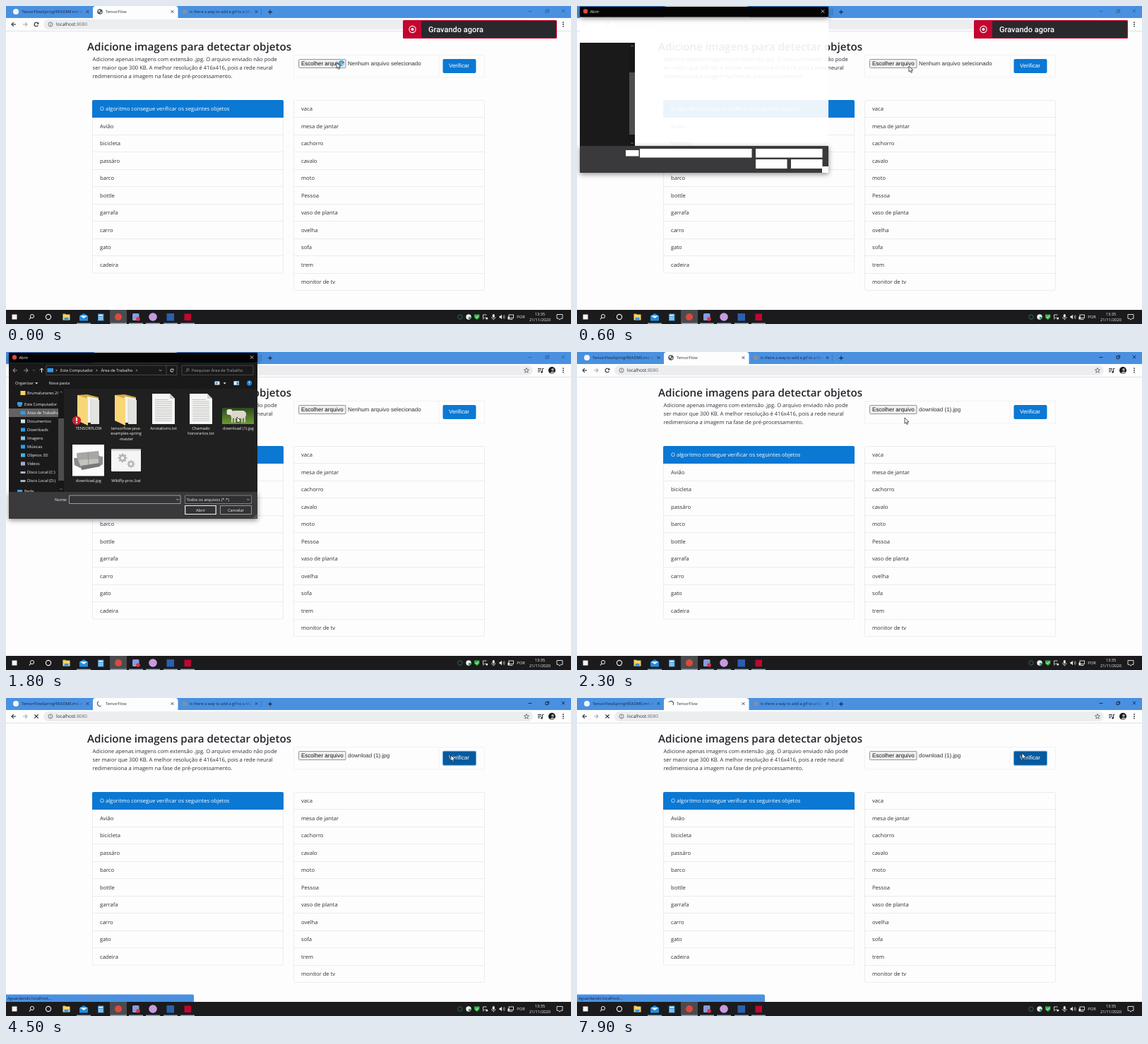
An HTML page with a canvas for the animation above (8000 ms loop, 800 by 450 pixels).

```html
<!DOCTYPE html>
<html lang="pt">
<head>
<meta charset="utf-8">
<title>Detector de objetos</title>
<style>
html, body { margin: 0; width: 100%; height: 100%; overflow: hidden; background: #fefdfe; }
canvas { display: block; width: 800px; height: 450px; }
</style>
</head>
<body>
<canvas id="stage" width="800" height="450"></canvas>
<script>
const ctx = document.getElementById('stage').getContext('2d');
const UI = '"Open Sans", "Noto Sans", sans-serif';
const ARIAL = '"Liberation Sans", Arial, sans-serif';
const LOOP = 8000, STEP = 100;
const BLUE = '#0b78d3', FRAME = '#4a90e0';
const clamp = v => Math.max(0, Math.min(1, v));

// ---- drawing helpers ----
function text(s, x, y, size, color, o = {}) {
  ctx.font = `${o.weight || 400} ${size}px ${o.family || UI}`;
  ctx.textAlign = o.align || 'left';
  ctx.fillStyle = color;
  ctx.fillText(s, x, y);
}
function rect(x, y, w, h, color) {
  ctx.fillStyle = color;
  ctx.fillRect(x, y, w, h);
}
function box(x, y, w, h, r, fill, stroke, lw = 1) {
  ctx.beginPath();
  ctx.roundRect(x, y, w, h, r);
  if (fill) { ctx.fillStyle = fill; ctx.fill(); }
  if (stroke) { ctx.strokeStyle = stroke; ctx.lineWidth = lw; ctx.stroke(); }
}
function disc(x, y, r, color) {
  ctx.beginPath();
  ctx.arc(x, y, r, 0, 7);
  ctx.fillStyle = color;
  ctx.fill();
}
function ring(x, y, r, color, lw = 1, a = 0, b = Math.PI * 2) {
  ctx.beginPath();
  ctx.arc(x, y, r, a, b);
  ctx.strokeStyle = color;
  ctx.lineWidth = lw;
  ctx.stroke();
}
function trace(pts) {
  ctx.beginPath();
  for (let i = 0; i < pts.length; i += 2) ctx.lineTo(pts[i], pts[i + 1]);
}
function line(color, lw, ...pts) {
  trace(pts);
  ctx.strokeStyle = color;
  ctx.lineWidth = lw;
  ctx.stroke();
}
function poly(color, ...pts) {
  trace(pts);
  ctx.closePath();
  ctx.fillStyle = color;
  ctx.fill();
}
function cross(x, y, r, color, lw = 1) {
  line(color, lw, x - r, y - r, x + r, y + r);
  line(color, lw, x - r, y + r, x + r, y - r);
}
function chevron(x, y, r, color, down) {
  if (down) line(color, .8, x - r, y - r / 2, x, y + r / 2, x + r, y - r / 2);
  else line(color, .8, x - r / 2, y - r, x + r / 2, y, x - r / 2, y + r);
}
function arrow(x, y, dir, color, r = 3) {
  line(color, 1.1, x - r, y, x + r, y);
  line(color, 1.1, x + dir * (r - 2.8), y - 2.8, x + dir * r, y, x + dir * (r - 2.8), y + 2.8);
}
function refresh(x, y, r, color) {
  ring(x, y, r, color, 1.1, .5, 5.5);
  poly(color, x + r + .6, y - r - .4, x + r + .6, y - .3, x + .3, y - .3);
}
function clipped(x, y, w, h, draw) {
  ctx.save();
  ctx.beginPath();
  ctx.rect(x, y, w, h);
  ctx.clip();
  draw();
  ctx.restore();
}
function fadeText(s, x, y, end, color) {
  const g = ctx.createLinearGradient(end - 14, 0, end, 0);
  g.addColorStop(0, color);
  g.addColorStop(1, FRAME);
  clipped(x, 0, end - x, 17, () => text(s, x, y, 5.6, g));
}

// ---- browser ----
function drawAvatar(x, y) {
  disc(x, y, 5, '#17191d');
  ctx.save();
  ctx.beginPath();
  ctx.arc(x, y, 5, 0, 7);
  ctx.clip();
  disc(x + 1, y - 1.2, 1.9, '#a5a3a4');
  disc(x + 1, y + 5, 3.6, '#a5a3a4');
  ctx.restore();
}
function drawBrowser(t) {
  const loading = t >= 3600, inactive = t < 2000;
  const ctl = inactive ? '#2d5c94' : '#0c1c30', icon = '#2b2e31';
  rect(0, 0, 800, 17, FRAME);
  disc(14, 8, 4, '#f4f7fb');
  fadeText('TensorFlowSpring/README.md at master', 22, 10.3, 110, '#10294a');
  cross(115.5, 8, 1.8, '#17375f', .9);
  box(123, 0, 120.5, 20, [4, 4, 0, 0], '#fdfdfe');
  if (loading) {
    const end = Math.PI / 2 + Math.max(0, t - 3730) / 1320 * Math.PI * 2;
    const start = Math.max(Math.PI / 2, end - Math.PI);
    ring(133, 8, 3.6, '#3b4a66', 1.1, -end, -start);
  } else {
    disc(133, 8, 3.8, '#55595e');
    poly('#e6e8ea', 130.5, 6.2, 133, 5.4, 133.4, 7.4, 131.4, 9);
    poly('#e6e8ea', 134.2, 8, 135.9, 8.6, 134.4, 10.7, 133.4, 9.4);
  }
  text('TensorFlow', 141, 10.3, 5.6, '#2f3336');
  cross(235.5, 8, 1.8, '#34373a', .9);
  rect(250.5, 5, 5, 6, '#8d8f91');
  fadeText('Is there a way to add a gif to a Markdown', 260, 10.3, 349, '#10294a');
  cross(354.5, 8, 1.8, '#17375f', .9);
  line('#2e69ae', .6, 361.5, 4, 361.5, 13);
  line('#10233d', 1.1, 371, 8.5, 377, 8.5);
  line('#10233d', 1.1, 374, 5.5, 374, 11.5);
  line(ctl, .8, 739.5, 7.5, 744.5, 7.5);
  ctx.strokeRect(764, 6, 3.5, 3.5);
  line(ctl, .7, 765.3, 5, 768.8, 5, 768.8, 8.5);
  cross(789, 7, 2.3, ctl, .8);

  rect(0, 17, 800, 18.5, '#fdfdfe');
  rect(0, 35, 800, 1, '#dfe1e5');
  arrow(11, 26, -1, icon);
  arrow(27, 26, 1, '#a9acb0');
  if (loading) cross(43, 26, 2.7, icon, 1.1);
  else refresh(43, 26, 2.8, icon);
  box(53, 19, 693, 14, 7, '#ebedef');
  ring(63, 26, 3.1, '#5f6368', .8);
  rect(62.6, 25.5, .9, 2.3, '#5f6368');
  rect(62.6, 24, .9, .9, '#5f6368');
  text('localhost', 71, 28.4, 6.53, '#26292c');
  text(':8080', 98.4, 28.4, 6.53, '#6a6e73');
  const star = [];
  for (let i = 0; i < 10; i++) {
    const a = i * Math.PI / 5 - Math.PI / 2, r = i % 2 ? 1.6 : 3.7;
    star.push(737 + r * Math.cos(a), 26.2 + r * Math.sin(a));
  }
  line('#55595e', .8, ...star, star[0], star[1]);
  [23.5, 25.7, 27.9].forEach((y, i) => line(icon, 1, 753, y, i < 2 ? 758 : 756, y));
  line(icon, 1, 759.5, 28.5, 759.5, 23.5, 761.5, 23.5);
  disc(758.6, 28.4, 1.3, icon);
  drawAvatar(773, 26);
  [23.2, 26, 28.8].forEach(y => disc(789, y, .9, icon));
}

// ---- page ----
const LEFT = ['Avião', 'bicicleta', 'passáro', 'barco', 'bottle', 'garrafa', 'carro', 'gato', 'cadeira'];
const RIGHT = ['vaca', 'mesa de jantar', 'cachorro', 'cavalo', 'moto', 'Pessoa', 'vaso de planta',
  'ovelha', 'sofa', 'trem', 'monitor de tv'];
const INTRO = ['Adicione apenas imagens com extensão .jpg. O arquivo enviado não pode',
  'ser maior que 300 KB. A melhor resolução é 416x416, pois a rede neural',
  'redimensiona a imagem na fase de pré-processamento.'];
const ROW = 24.5, TOP = 133, BODY = 7.64, INK = '#2c3034';

function drawList(x, items, first) {
  const rows = items.length + first;
  box(x + .5, TOP + .5, 270, rows * ROW - .5, 2, '#fefdfe', '#e9e9ec', .9);
  for (let i = 1; i < rows; i++) rect(x + .5, Math.floor(TOP + i * ROW), 270, .9, '#e9e9ec');
  items.forEach((s, i) => text(s, x + 11, 148.4 + (i + first) * ROW, BODY, INK));
}
function drawPage(t) {
  rect(0, 36, 800, 394, '#fefdfe');
  text('Adicione imagens para detectar objetos', 115, 63, 15.13, '#212529', { weight: 600 });
  INTRO.forEach((s, i) => text(s, 122.5, 78 + i * 12, BODY, INK));
  drawList(122, LEFT, 1);
  box(122, TOP, 271, 25, [2, 2, 0, 0], BLUE);
  text('O algoritmo consegue verificar os seguintes objetos', 133, 148.4, BODY, '#fff');
  drawList(407, RIGHT, 0);

  box(407.5, 69.5, 270, 31.5, 0, null, '#f0f0f2', .9);
  rect(612.5, 69.5, .9, 31.5, '#f0f0f2');
  box(414.5, 75.5, 66.5, 12, 1, '#efefef', '#8c8c8c', .9);
  text('Escolher arquivo', 418, 84, 8, '#111', { family: ARIAL });
  text(t < 2000 ? 'Nenhum arquivo selecionado' : 'download (1).jpg', 484, 84, 8, '#333', { family: ARIAL });
  if (t >= 3600) box(618, 74.7, 48, 21, 2, '#5aa6e2');
  if (t >= 3600) box(619, 75.7, 46, 19, 1.5, '#075a9f');
  else box(618.5, 75, 47, 20, 2, t >= 3100 ? '#075a9f' : BLUE);
  text('Verificar', 627, 87.4, 8, '#fff', { family: ARIAL });

  if (t >= 3700) {
    box(-1, 419.5, 267, 11, [0, 2, 0, 0], FRAME);
    text('Aguardando localhost...', 2, 427.2, 5.7, '#0f2a4d');
  }
}

// ---- taskbar ----
function drawTaskbar() {
  rect(0, 430, 800, 20, '#1b1b1d');
  rect(8.5, 436.5, 7, 7, '#f4f4f4');
  ring(37, 439, 2.6, '#eee', 1);
  line('#eee', 1.1, 35.2, 440.9, 32.8, 443.5);
  ring(60, 440, 3.6, '#eee', 1.2);
  rect(147, 430, 24, 20, '#4b4b4e');

  rect(80.5, 435.5, 4, 2, '#e0a92e');
  rect(80.5, 436.5, 10, 8, '#f6d36b');
  rect(82.5, 440.8, 6, 3.7, '#3c97d8');
  poly('#1f8ee0', 104, 438.5, 110, 435, 116, 438.5, 116, 445.5, 104, 445.5);
  poly('#eaf5fd', 104.8, 438.3, 115.2, 438.3, 110, 442);
  rect(130, 435.5, 8.5, 10, '#3a8fcd');
  rect(131.2, 436.7, 6, 2, '#eaf4fb');
  for (let i = 0; i < 9; i++) rect(131.2 + i % 3 * 2.2, 440 + (i / 3 | 0) * 1.7, 1.5, 1.1, '#eaf4fb');
  disc(159, 440, 5, '#dc4a3c');
  box(179, 435, 9.5, 10, 1.5, '#8a9be0');
  disc(187, 443, 2.8, '#e0343c');
  disc(208, 440, 5.8, '#c79be0');
  rect(227.5, 435, 10.5, 10.5, '#2b5fb0');
  rect(252.5, 435.5, 9.5, 9.5, '#c4062e');
  [100, 148, 174, 198, 223, 247].forEach((x, i) => rect(x, 448.6, i === 1 ? 23 : 20, 1.4, '#76b9ed'));

  ring(643, 440, 3, '#2c4a44', 1.4);
  disc(655, 440, 3.7, '#f0f0f0');
  disc(656.5, 441.5, 1.8, '#2aa04a');
  poly('#36b54a', 663, 436.6, 670.5, 436.6, 670.3, 441, 666.8, 444, 663.2, 441);
  line('#fff', .9, 664.8, 439.8, 666.3, 441.3, 668.8, 438.3);
  line('#e8e8e8', .9, 675.5, 442, 675.5, 437, 680.5, 437);
  line('#e8e8e8', .8, 675, 443.5, 679, 440);
  disc(680.7, 442, 1.6, '#e8e8e8');
  box(688.8, 436, 3, 5, 1.5, '#eee');
  ring(690.3, 440, 2.8, '#eee', .7, 0, Math.PI);
  line('#eee', .8, 690.3, 442.5, 690.3, 444.3);
  poly('#eee', 698.5, 438.8, 700, 438.8, 702, 436.8, 702, 443.2, 700, 441.2, 698.5, 441.2);
  ring(702, 440, 2.4, '#ddd', .7, -.8, .8);
  ring(702, 440, 4.2, '#ddd', .7, -.8, .8);
  ctx.strokeStyle = '#eee';
  ctx.lineWidth = .9;
  ctx.strokeRect(712, 437, 6.5, 4.5);
  line('#eee', .9, 713, 443.5, 717.5, 443.5);
  rect(710.5, 439.5, 2.4, 4, '#eee');
  text('POR', 729, 442.2, 5.7, '#f2f2f2', { align: 'center' });
  text('13:35', 756, 437.8, 5.66, '#f2f2f2', { align: 'center' });
  text('21/11/2020', 756, 446.2, 5.66, '#f2f2f2', { align: 'center' });
  line('#eee', .9, 780, 436.5, 788, 436.5, 788, 442.3, 785.5, 442.3, 784, 444.2, 782.5, 442.3, 780, 442.3, 780, 436.5);
}

// ---- file dialog ----
const SIDE = [['Documentos', '#d8e2ea'], ['Downloads', '#2a9be8'], ['Imagens', '#8cc4e8'], ['Músicas', '#2f9df0'],
  ['Objetos 3D', '#45b5d8'], ['Vídeos', '#b7a4c8'], ['Disco Local (C:)', '#aab4bc'], ['Disco Local (D:)', '#aab4bc']];
const PALE = '#f2f2f2', SMALL = 5.7;

function dialogFrame() {
  ctx.save();
  ctx.shadowColor = 'rgba(0,0,0,.45)';
  ctx.shadowBlur = 7;
  ctx.shadowOffsetY = 2;
  rect(4, 1, 352, 14.5, '#040404');
  rect(4, 198, 352, 38, '#3a3a3c');
  ctx.restore();
  disc(12, 7.5, 3.2, '#dc4a3c');
  text('Abrir', 18.5, 9.8, SMALL, PALE);
  cross(348, 7.5, 2.2, PALE, .8);
}
function sidebarBase() {
  rect(4, 52, 78, 146, '#1a1a1b');
  rect(74, 52, 8, 146, '#171718');
  rect(74, 94, 8, 88, '#4d4d4f');
  line('#999', .8, 76.3, 57.5, 78, 55.8, 79.7, 57.5);
  chevron(78, 194, 1.7, '#999', true);
}
function drawLoadingDialog() {
  rect(4, 15.5, 352, 36.5, 'rgba(255,255,255,.97)');
  rect(82, 52, 274, 146, 'rgba(255,255,255,.92)');
  dialogFrame();
  sidebarBase();
  rect(69, 204, 18.5, 8.5, '#fff');
  rect(89, 202, 158.5, 12.5, '#fff');
  rect(253, 202, 94.5, 12.5, '#fff');
  rect(253, 217, 44.5, 13, '#fff');
  rect(303, 217, 44.5, 13, '#fff');
  rect(347, 227, 9, 9, '#fff');
}
function label(x, ...rows) {
  rows.forEach((s, i) => text(s, x, 109.6 + i * 7.6, SMALL, PALE, { align: 'center' }));
}
function folder(x) {
  poly('#d9ab45', x - 16, 61, x - 2, 60, x + 14, 64, x + 14, 98, x - 15, 98);
  poly('#f4f4f2', x - 2, 63, x + 14, 66, x + 14, 100, x - 2, 100);
  poly('#e3e3e0', x + 3, 66, x + 15, 68, x + 15, 102, x + 3, 102);
  line('#bbb', .5, x + 3, 66, x + 3, 101);
  poly('#f9d778', x - 16, 61, x - 1, 66, x - 1, 104, x - 16, 97);
}
function sheet(x) {
  poly('#f5f5f4', x - 16, 59, x + 9, 59, x + 16, 66, x + 16, 102, x - 16, 102);
  poly('#cfcfcf', x + 9, 59, x + 16, 66, x + 9, 66);
  for (let y = 67; y < 98; y += 2.7) rect(x - 12, y, y < 69 ? 19 : 24, .8, '#b4b4b4');
}
function gear(x, y, r) {
  for (let i = 0; i < 8; i++) {
    const a = i * Math.PI / 4;
    line('#b3b6b9', r * .45, x, y, x + r * 1.3 * Math.cos(a), y + r * 1.3 * Math.sin(a));
  }
  disc(x, y, r, '#b3b6b9');
  disc(x, y, r * .45, '#f5f5f5');
}
function drawFiles() {
  folder(117);
  disc(100, 97, 6.2, '#d3222c');
  rect(99.2, 92.8, 1.8, 5, '#fff');
  rect(99.2, 99, 1.8, 1.8, '#fff');
  label(117, 'TENSORFLOW');
  folder(170);
  label(170, 'tensorflow-java-', 'examples-spring', '-master');
  sheet(223);
  label(223, 'Anotations.txt');
  sheet(276);
  label(276, 'Chamado', 'honorarios.txt');

  const grass = ctx.createLinearGradient(0, 79, 0, 102);
  grass.addColorStop(0, '#2f4a1c');
  grass.addColorStop(1, '#6d9a35');
  rect(306, 79, 45, 23, grass);
  box(318, 83, 22, 11, 5, '#dcd8cc');
  box(312.5, 81, 8, 8, 3, '#e8e4da');
  [319, 323, 333, 337].forEach(x => rect(x, 92, 2, 7.5, '#cfcabc'));
  label(329, 'download (1).jpg');

  rect(94, 131, 45, 44.5, '#fcfcfc');
  poly('#a7a7a5', 100, 143, 131, 140, 133, 154, 101, 157);
  poly('#c3c3c0', 97, 153, 133, 151, 134, 158, 106, 163);
  poly('#8b8b89', 96, 150, 101, 150, 107, 165, 97, 160);
  poly('#929290', 130, 147, 137, 148, 137, 159, 132, 162);
  poly('#777775', 106, 161, 133, 157, 133, 162, 107, 167);
  line('#878785', .8, 116, 142, 117, 160);
  text('download.jpg', 117, 183.6, SMALL, PALE, { align: 'center' });

  box(149, 137.5, 42, 31.5, 1, '#f5f5f5');
  rect(149, 137.5, 42, 2.5, '#d6d8da');
  gear(165, 150, 5);
  gear(177, 158.5, 4.2);
  text('Wildfly-proc.bat', 170, 183.6, SMALL, PALE, { align: 'center' });
}
function drawSidebar() {
  sidebarBase();
  clipped(4, 52, 70, 146, () => {
    rect(4, 80, 70, 12, '#626264');
    rect(20.5, 55, 7, 6, '#f4cf66');
    text('Brumalunares 201', 30, 60.3, SMALL, PALE);
    rect(16, 71, 7, 4.5, '#3aa0e6');
    rect(17.5, 76, 4, 1, '#cde');
    text('Este Computador', 26, 76.3, SMALL, PALE);
    rect(20.5, 83.5, 7, 5, '#2f9bea');
    text('Área de Trabalho', 30, 88.3, SMALL, PALE);
    SIDE.forEach(([s, c], i) => {
      const y = 98 + i * 12;
      if (i > 5) rect(20.5, y - 1, 7, 3, c);
      else rect(21, y - 2.6, 6, 5.2, c);
      text(s, 30, y + 2.3, SMALL, PALE);
    });
    rect(16, 195, 7, 4, '#3aa0e6');
    text('Rede', 26, 199.3, SMALL, PALE);
  });
}
function drawDialog() {
  dialogFrame();
  rect(4, 15.5, 352, 36.5, '#19191a');
  rect(82, 52, 274, 146, '#202021');
  arrow(13, 26, -1, '#8a8a8a');
  arrow(28, 26, 1, '#8a8a8a');
  chevron(39.5, 26, 1.5, '#8a8a8a', true);
  line(PALE, 1, 50.5, 29, 50.5, 23.2);
  line(PALE, 1, 48, 25.6, 50.5, 23.1, 53, 25.6);
  box(57, 19, 185, 13.5, 0, null, '#505052', .8);
  rect(58.5, 23, 8.5, 5.6, '#2f9bea');
  chevron(71.5, 26, 1.4, '#ccc');
  text('Este Computador', 77, 28.2, SMALL, PALE);
  chevron(128.5, 26, 1.4, '#ccc');
  text('Área de Trabalho', 134.5, 28.2, SMALL, PALE);
  chevron(185, 26, 1.4, '#ccc');
  chevron(218.5, 26, 1.8, '#ccc', true);
  line('#505052', .8, 227, 19, 227, 32.5);
  refresh(235, 26, 2, '#ccc');
  box(249, 19, 101, 13.5, 0, null, '#505052', .8);
  ring(257.5, 25, 1.7, '#999', .7);
  line('#999', .7, 256.3, 26.3, 254.5, 28.3);
  text('Pesquisar Área de Trabalho', 263, 28.2, SMALL, '#a2a2a2');

  text('Organizar', 13, 46.2, SMALL, PALE);
  poly(PALE, 41.2, 43.2, 45.2, 43.2, 43.2, 45.4);
  text('Nova pasta', 60.5, 46.2, SMALL, PALE);
  rect(295.5, 41.5, 7, 5, '#d9e8f2');
  rect(297, 43, 2.5, 2.2, '#3b92d0');
  poly(PALE, 307.6, 43.2, 311.6, 43.2, 309.6, 45.4);
  rect(322.5, 41.3, 7.5, 5.5, '#e8eef2');
  rect(326.5, 42.3, 3, 4, '#3b92d0');
  disc(344.5, 44, 3.7, '#1577d2');
  text('?', 344.5, 46.2, 6, '#fff', { align: 'center', weight: 700 });

  drawSidebar();
  drawFiles();
  text('Nome:', 69, 210.5, SMALL, PALE);
  box(89.5, 203, 157.5, 11.5, 0, '#363638', '#a8a8aa', .9);
  chevron(243, 208.8, 1.6, '#ddd', true);
  box(253.5, 203, 94, 11.5, 0, '#303032', '#858587', .9);
  text('Todos os arquivos (*.*)', 255.5, 210.5, SMALL, PALE);
  chevron(343, 208.8, 1.6, '#ddd', true);
  box(253.7, 217.5, 43.5, 12, 0, '#333335', '#f0f0f0', 1.2);
  text('Abrir', 275.5, 225.6, SMALL, PALE, { align: 'center' });
  box(303.5, 217.5, 44, 12, 0, '#333335', '#a5a5a7', .9);
  text('Cancelar', 325.5, 225.6, SMALL, PALE, { align: 'center' });
  for (let i = 0; i < 3; i++)
    for (let j = 0; j <= i; j++) rect(354 - j * 1.8, 230.4 + i * 1.8, 1, 1, '#a5a5a5');
}

// ---- recording notice ----
function drawNotice() {
  box(562, 20, 218, 26, 1.5, '#c4052f');
  rect(588, 21.3, 190.7, 23.4, '#29282c');
  ring(575.5, 33, 4.6, '#fff', 1.1);
  disc(575.5, 33, 2, '#fff');
  text('Gravando agora', 598, 37, 11, '#fff', { weight: 500, family: 'Roboto, "Open Sans", sans-serif' });
}

// ---- pointer: time, x, y ----
const PATH = [[0, 468, 80], [500, 470, 85], [800, 470, 85], [1200, 387, 90], [1500, 327, 92], [1900, 327, 92],
  [2300, 464, 93], [2700, 520, 92], [3200, 630, 81], [4700, 630, 81], [4900, 630, 78], [LOOP, 630, 78]];

function drawPointer(t) {
  const i = PATH.findIndex((p, k) => k && t <= p[0]);
  const [t0, x0, y0] = PATH[i - 1], [t1, x1, y1] = PATH[i];
  const k = (t - t0) / (t1 - t0);
  ctx.save();
  ctx.translate(x0 + (x1 - x0) * k, y0 + (y1 - y0) * k);
  trace([0, 0, 0, 8.2, 1.9, 6.5, 3.1, 9.4, 4.5, 8.8, 3.3, 6, 5.8, 5.9]);
  ctx.closePath();
  ctx.fillStyle = '#fff';
  ctx.fill();
  ctx.strokeStyle = '#111';
  ctx.lineWidth = .7;
  ctx.stroke();
  if (t < 400) {
    ring(7, 1, 3, '#2b9fe0', 2);
    ring(7, 1, 3, '#9adcff', 1.6, t / 160, t / 160 + 1.4);
  }
  ctx.restore();
}

function withAlpha(a, draw) {
  if (a <= 0) return;
  ctx.save();
  ctx.globalAlpha = a;
  draw();
  ctx.restore();
}
function render(t) {
  ctx.textRendering = 'geometricPrecision';
  ctx.textBaseline = 'alphabetic';
  drawBrowser(t);
  drawPage(t);
  drawTaskbar();
  if (t < 800) withAlpha(clamp((t - 300) / 200), drawLoadingDialog);
  else withAlpha(t < 1900 ? 1 : clamp((2000 - t) / 200), drawDialog);
  withAlpha(clamp((1100 - t) / 300), drawNotice);
  drawPointer(t);
}
function tick() {
  const t = performance.now() % LOOP;
  render(Math.floor(t / STEP) * STEP);
  requestAnimationFrame(tick);
}
tick();
</script>
</body>
</html>
```
